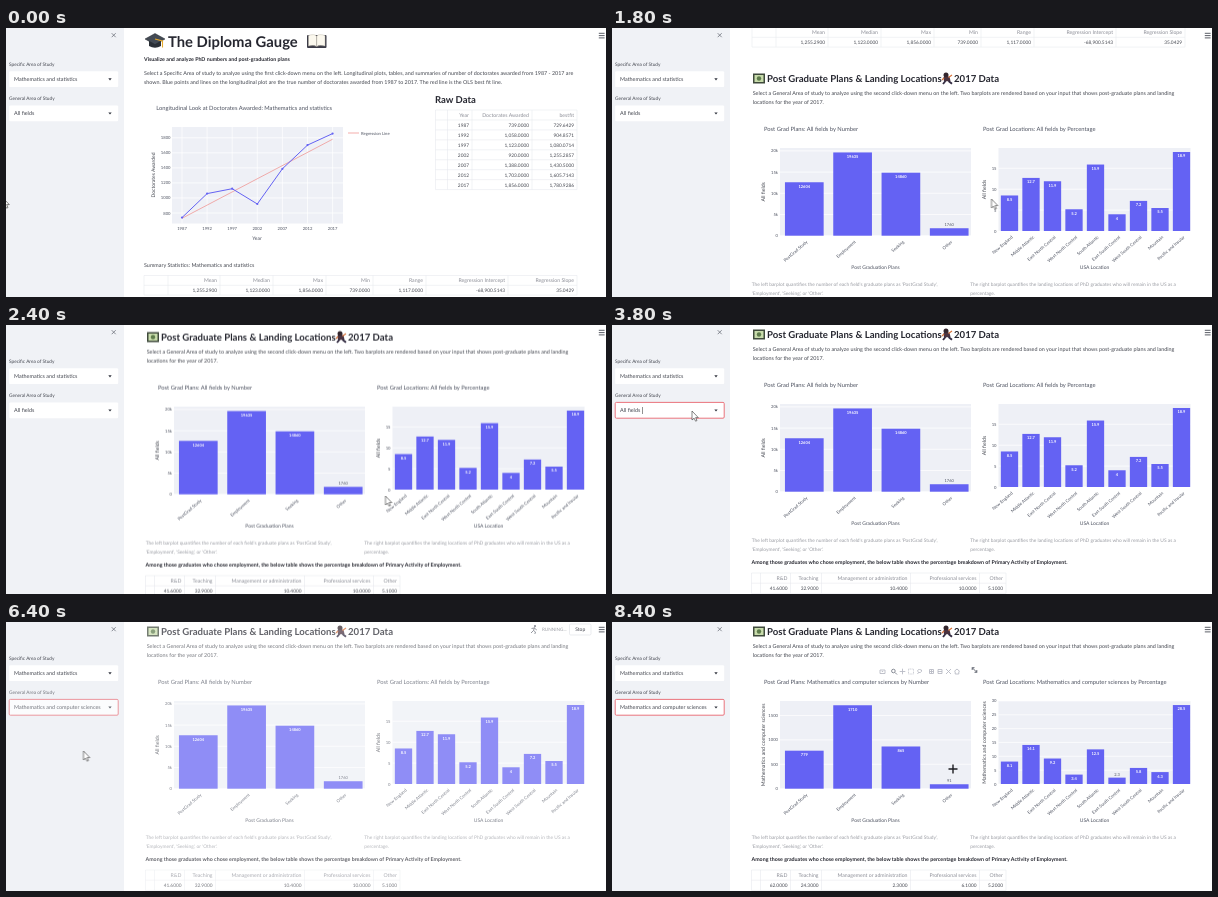
These frames come from a looping animation (600 px wide and 269 px high, 8500 ms). An HTML page:

```html
<!DOCTYPE html>
<html lang="en">
<head>
<meta charset="utf-8">
<title>The Diploma Gauge</title>
<style>
  html, body { margin: 0; width: 100%; height: 100%; overflow: hidden; background: #fff; }
  svg { display: block; width: 100%; height: 100%; }
  text { font-family: Lato, "Open Sans", sans-serif; fill: #43464f; text-rendering: geometricPrecision; }
  .bold { font-weight: 700; fill: #262730; }
  .soft { fill: #9a9ca3; }
  .head { fill: #8b8d96; }
  .plot { fill: #4d5260; }
  .value { fill: #fff; font-weight: 700; }
  .end { text-anchor: end; }
  .mid { text-anchor: middle; }
</style>
</head>
<body>
<svg id="stage" viewBox="0 0 600 269" preserveAspectRatio="none"></svg>
<script>
const LOOP = 8500, FRAME = 100;
const BLUE = '#6462f3', PLOT_BG = '#eef0f6', RULE = '#e3e5ea', RED = '#e8656f';

// ---- drawing helpers -------------------------------------------------
const escape = s => String(s).replace(/&/g, '&amp;').replace(/</g, '&lt;');
const text = (x, y, s, size = 5.4, cls = '') =>
  `<text x="${x}" y="${y + size * 0.36}" font-size="${size}" class="${cls}">${escape(s)}</text>`;
const turned = (x, y, angle, s, size, cls) =>
  `<g transform="translate(${x} ${y}) rotate(${angle})">${text(0, 0, s, size, cls)}</g>`;
const rect = (x, y, w, h, fill, extra = '') =>
  `<rect x="${x}" y="${y}" width="${w}" height="${h}" fill="${fill}" ${extra}/>`;
const path = (d, stroke, width = 0.6, fill = 'none') =>
  `<path d="${d}" stroke="${stroke}" stroke-width="${width}" fill="${fill}"/>`;
const group = (id, body) => `<g id="${id}">${body}</g>`;
const at = (x, y, body) => `<g transform="translate(${x} ${y})">${body}</g>`;

function table(top, rowHeight, edges, rows) {
  const [left, right] = [edges[0], edges.at(-1)];
  const bottom = top + rowHeight * rows.length;
  let d = edges.map(x => `M${x} ${top}V${bottom}`).join('');
  for (let i = 0; i <= rows.length; i++) d += `M${left} ${top + i * rowHeight}H${right}`;
  const cells = rows.map((row, r) => row.map((cell, c) =>
    text(edges[c + 2] - 3, top + (r + 0.52) * rowHeight, cell, r ? 4.8 : 5.2, r ? 'end' : 'end head')).join(''));
  return path(d, RULE, 0.5) + cells.join('');
}

function barChart(c) {
  const y = v => c.base - v * c.scale;
  let out = rect(c.left, 79, c.right - c.left, c.base - 79, PLOT_BG);
  c.ticks.forEach(([v, label]) => {
    out += path(`M${c.left} ${y(v)}H${c.right}`, '#fff', 0.7) + text(c.left - 2, y(v), label, 4.2, 'end plot');
  });
  c.values.forEach((v, i) => {
    const x = c.first + c.pitch * i, small = c.base - y(v) < 8;
    out += rect(x - c.width / 2, y(v), c.width, c.base - y(v), BLUE)
      + text(x, y(v) + (small ? -3.5 : 4), v, 4, small ? 'mid plot' : 'mid value')
      + turned(x + 2.5, c.base + 5.5, -41, c.names[i], 4.4, 'end plot');
  });
  return out + text(c.titleX, 60, c.title, 5.8, 'plot')
    + turned(c.fieldX, (79 + c.base) / 2, -90, c.field, 5.2, 'mid')
    + text((c.left + c.right) / 2, 198.5, c.xLabel, 5, 'mid plot');
}

// ---- top of the page -------------------------------------------------
const cap = path('M143 12V18Q149 21.5 155 18V12Z', 'none', 0, '#2a2f36')
  + path('M139 11L149 5.5L159 11L149 16.5Z', '#22262c', 0.5, '#434a54')
  + path('M149 11L156.5 13V19.5', '#e8ab2c', 1.1);
const book = rect(301, 7, 19.5, 13, '#3c3c48', 'rx="1"')
  + path('M302.5 7.5Q308 5.5 310.5 8V18.5Q308 16.5 302.5 18ZM319 7.5Q313 5.5 310.8 8V18.5Q313 16.5 319 18Z', '#b9b4a6', 0.4, '#fbf8ee');

const years = [1987, 1992, 1997, 2002, 2007, 2012, 2017];
const awarded = [739, 1058, 1123, 920, 1388, 1703, 1856];
const fit = [729.6429, 904.8571, 1080.0714, 1255.2857, 1430.5, 1605.7143, 1780.9286];
const decimals = v => v.toLocaleString('en-US', { minimumFractionDigits: 4 });

function lineChart() {
  const x = i => 176 + 25.1 * i, y = v => 185 - (v - 800) * 0.0752;
  const points = awarded.map((v, i) => `${x(i)} ${y(v)}`);
  let out = rect(166, 99, 171, 96.5, PLOT_BG);
  years.forEach((year, i) => {
    out += path(`M${x(i)} 99V195.5`, '#fff', 0.7) + text(x(i), 200.3, year, 4.2, 'mid plot');
  });
  for (let v = 800; v <= 1800; v += 200)
    out += path(`M166 ${y(v)}H337`, '#fff', 0.7) + text(164.5, y(v), v, 4.2, 'end plot');
  out += path(`M${x(0)} ${y(fit[0])}L${x(6)} ${y(fit[6])}M342 105H353`, '#f08c88', 0.7)
    + path('M' + points.join('L'), BLUE, 1)
    + awarded.map((v, i) => `<circle cx="${x(i)}" cy="${y(v)}" r="1.1" fill="${BLUE}"/>`).join('');
  return out + text(355, 105, 'Regression Line', 4.2, 'plot')
    + text(150.3, 79.7, 'Longitudinal Look at Doctorates Awarded: Mathematics and statistics', 5.8, 'plot')
    + turned(147, 147, -90, 'Doctorates Awarded', 5, 'mid')
    + text(251, 210, 'Year', 5, 'mid plot');
}

const overview = cap + book
  + text(162, 13.3, 'The Diploma Gauge', 14.8, 'bold')
  + text(138, 31, 'Visualize and analyze PhD numbers and post-graduation plans', 5.3, 'bold')
  + text(138, 45, 'Select a Specific Area of study to analyze using the first click-down menu on the left. Longitudinal plots, tables, and summaries of number of doctorates awarded from 1987 - 2017 are')
  + text(138, 54, 'shown. Blue points and lines on the longitudinal plot are the true number of doctorates awarded from 1987 to 2017. The red line is the OLS best fit line.')
  + lineChart()
  + text(429, 71.5, 'Raw Data', 9.5, 'bold')
  + table(82, 9.95, [429.5, 441.5, 466, 526, 571],
    [['Year', 'Doctorates Awarded', 'bestfit'],
      ...years.map((year, i) => [year, decimals(awarded[i]), decimals(fit[i])])])
  + text(138, 237.5, 'Summary Statistics: Mathematics and statistics')
  + table(247.5, 9.8, [138, 162, 214, 267, 320, 367, 420, 502, 571], [
    ['Mean', 'Median', 'Max', 'Min', 'Range', 'Regression Intercept', 'Regression Slope'],
    ['1,255.2900', '1,123.0000', '1,856.0000', '739.0000', '1,117.0000', '-68,900.5143', '35.0429']]);

// ---- lower part of the page ------------------------------------------
const bill = rect(141, 4.5, 12, 10, '#3f4a3c') + rect(142.5, 6, 9, 7, '#c8dcab')
  + '<circle cx="147" cy="9.5" r="2.2" fill="#5e7c4c"/>';
const dancer = '<circle cx="334" cy="6" r="2.5" fill="#33262d"/>'
  + path('M331.5 8L337.5 7.5L338.5 12L332 12.5Z', 'none', 0, '#4a3340')
  + path('M336.5 8.5L340 6M332 9L330 11', '#d9733a', 1.2)
  + path('M333.5 12L331 15M336.5 12L340 14.8', '#332c42', 1.9);

const plans = ['PostGrad Study', 'Employment', 'Seeking', 'Other'];
const regions = ['New England', 'Middle Atlantic', 'East North Central', 'West North Central', 'South Atlantic',
  'East South Central', 'West South Central', 'Mountain', 'Pacific and Insular'];
const planChart = o => barChart({ left: 168, right: 359, base: 166.7, first: 192.3, pitch: 48.3, width: 38.7,
  names: plans, titleX: 152, fieldX: 151.5, xLabel: 'Post Graduation Plans',
  title: `Post Grad Plans: ${o.field} by Number`, ...o });
const regionChart = o => barChart({ left: 386.5, right: 578.5, base: 162, first: 397.5, pitch: 21.5, width: 17.3,
  names: regions, titleX: 371, fieldX: 372.5, xLabel: 'USA Location',
  title: `Post Grad Locations: ${o.field} by Percentage`, ...o });

const dataset = (field, planOptions, regionOptions, shares) =>
  planChart({ field, ...planOptions }) + regionChart({ field, ...regionOptions })
  + table(248, 10.2, [139.5, 148.5, 178.5, 209.5, 298.5, 367.5, 394], [
    ['R&D', 'Teaching', 'Management or administration', 'Professional services', 'Other'],
    shares.map(v => v.toFixed(4))]);
const every = (step, max, label = v => v) =>
  Array.from({ length: max / step + 1 }, (_, i) => [i * step, label(i * step)]);

const allFields = dataset('All fields',
  { scale: 0.00424, ticks: every(5000, 20000, v => v ? v / 1000 + 'k' : 0), values: [12604, 19635, 14860, 1760] },
  { scale: 4.18, ticks: every(5, 15), values: [8.5, 12.7, 11.9, 5.2, 15.9, 4, 7.2, 5.5, 18.9] },
  [41.6, 32.9, 10.4, 10, 5.1]);
const mathFields = dataset('Mathematics and computer sciences',
  { scale: 0.0488, ticks: every(500, 1500), values: [779, 1710, 865, 91] },
  { scale: 2.77, ticks: every(5, 30), values: [8.1, 14.1, 9.2, 3.4, 12.5, 2.3, 5.8, 4.3, 28.5] },
  [62, 24.3, 2.3, 6.1, 5.2]);

const toolIcon = (x, d, stroke = '#b9bcc6') => at(x, 49.5, path(d, stroke, 0.9));
const toolbar = toolIcon(270.5, 'M-2.5 -1.5H2.5V2H-2.5ZM-.7 0H.7')
  + toolIcon(282, 'M1 1L3 3M1.2 -.5A1.8 1.8 0 1 1 -2.4 -.5A1.8 1.8 0 1 1 1.2 -.5', '#7c808c')
  + toolIcon(290.5, 'M-2.8 0H2.8M0 -2.8V2.8')
  + '<rect x="296.5" y="47" width="5" height="5" fill="none" stroke="#b9bcc6" stroke-dasharray="1 .6" stroke-width=".7"/>'
  + toolIcon(307.5, 'M-2 2.5L-1 1Q-3 -2 0 -2Q3 -2 2 0Q1 1.5 -1 1')
  + toolIcon(319.5, 'M-2 -2H2V2H-2ZM-2 0H2M0 -2V2')
  + toolIcon(328, 'M-2 -2H2V2H-2ZM-2 0H2')
  + toolIcon(336.5, 'M-2.5 -2.5L2.5 2.5M2.5 -2.5L-2.5 2.5')
  + toolIcon(345, 'M-2.8 0L0 -2.5L2.8 0M-1.8 0V2.5H1.8V0')
  + at(362.5, 48, path('M-2.3 0V-2.3H0M2.3 0V2.3H0M-2.3 -2.3L2.3 2.3', '#555a66', 0.9));

const outlook = bill + dancer
  + text(155, 9.7, 'Post Graduate Plans & Landing Locations', 9.6, 'bold')
  + text(342, 9.7, '2017 Data', 9.6, 'bold')
  + text(140.7, 23.7, 'Select a General Area of study to analyze using the second click-down menu on the left. Two barplots are rendered based on your input that shows post-graduate plans and landing')
  + text(140.7, 33.5, 'locations for the year of 2017.')
  + group('allFields', allFields) + group('mathFields', mathFields)
  + text(139.7, 215.5, "The left barplot quantifies the number of each field's graduate plans as 'PostGrad Study',", 4.85, 'soft')
  + text(139.7, 224, "'Employment', 'Seeking', or 'Other'.", 4.85, 'soft')
  + text(358.3, 215.5, 'The right barplot quantifies the landing locations of PhD graduates who will remain in the US as a', 4.85, 'soft')
  + text(358.3, 224, 'percentage.', 4.85, 'soft')
  + text(139.5, 237.3, 'Among those graduates who chose employment, the below table shows the percentage breakdown of Primary Activity of Employment.', 5.3, 'bold');

// ---- sidebar, menu and status ----------------------------------------
const selectBox = y => rect(3.2, y, 109, 15.8, '#fff', 'rx="1.2"')
  + path(`M102.3 ${y + 7}H105.7L104 ${y + 9.2}Z`, 'none', 0, '#333640');
const sidebar = rect(0, 0, 118, 269, '#f0f2f6')
  + path('M105.7 5.2L109.7 9.2M109.7 5.2L105.7 9.2', '#6d707a', 0.8)
  + text(3, 36, 'Specific Area of Study', 4.75) + selectBox(43.3)
  + text(8, 51.5, 'Mathematics and statistics', 5.45)
  + group('general', text(3, 70, 'General Area of Study', 4.75) + selectBox(77.4)
    + group('choiceAll', text(8, 85.5, 'All fields', 5.45))
    + group('choiceMath', text(8, 85.5, 'Mathematics and computer sciences', 5.45))
    + group('focus', rect(3.2, 77.4, 109, 15.8, 'none', `rx="1.2" stroke="${RED}" stroke-width=".9"`))
    + group('caret', path('M30.6 82V89', '#333', 0.6)));

const options = ['All fields', 'Life sciences', 'Physical sciences and earth sciences', 'Mathematics and computer sciences',
  'Psychology and social sciences', 'Engineering', 'Education', 'Humanities and arts', 'Other'];
const ROW = 14.4;
const menu = rect(2.5, 97, 111.5, 112, '#000', 'opacity=".08" rx="1.5"') + rect(3, 97, 110, 110, '#fff', 'rx="1.2"')
  + '<clipPath id="menuClip"><rect x="3" y="97" width="110" height="110"/></clipPath>'
  + `<g clip-path="url(#menuClip)">` + group('optionList',
    group('highlight', rect(3, 97, 107, ROW, '#eef0f5'))
    + options.map((name, i) => text(9, 104.2 + ROW * i, name)).join('')) + '</g>'
  + group('thumb', rect(110, 97, 2.2, 90, '#a5a7ac'));

const status = at(528, 7.5, '<circle cx="1" cy="-3.4" r="1.1" fill="#8a8d96"/>'
    + path('M.5 -2L-.5 1L1.5 2.5L.8 4.5M-.5 1L-3 3.5M-2.5 -1L.3 -1.5L2.8 .5', '#8a8d96', 0.9))
  + text(536, 7.8, 'RUNNING...', 4.6, 'soft')
  + rect(563.5, 2, 21.5, 11, '#fff', 'rx="1.2" stroke="#dcdfe5" stroke-width=".6"')
  + text(574.2, 7.5, 'Stop', 5, 'mid');

const pointer = group('arrow', path('M0 0V9L2.1 7.2L3.6 10.2L5 9.5L3.6 6.6H6.3Z', '#333', 0.6, '#fff'))
  + group('hand', path('M-1 1Q-1 0 0 0T1 1V4L4.5 5Q5.4 5.4 5.2 6.5L4.5 10H0L-3 6.8Q-3 5.5 -1 6.5Z', '#333', 0.6, '#fff'))
  + group('cross', path('M-4.5 0H4.5M0 -4.5V4.5', '#1d1d22', 1.4));

document.getElementById('stage').innerHTML = rect(0, 0, 600, 269, '#fff')
  + group('page', group('stale', overview + at(-2, 289, outlook + group('toolbar', toolbar))))
  + path('M592.8 5.3H598.6M592.8 7.6H598.6M592.8 9.9H598.6', '#4a4d57', 0.9)
  + group('status', status) + sidebar + group('menu', menu) + group('pointer', pointer);

// ---- timing: every segment advances in whole frames -------------------
function play(id, property, steps) {
  const all = [...steps, [LOOP, steps.at(-1)[1]]];
  const frames = all.map(([time, value], i) => ({
    offset: time / LOOP,
    [property]: value,
    easing: i + 1 < all.length ? `steps(${Math.max(1, Math.round((all[i + 1][0] - time) / FRAME))})` : 'linear'
  }));
  document.getElementById(id).animate(frames, { duration: LOOP, iterations: Infinity });
}
const move = (id, steps) =>
  play(id, 'transform', steps.map(([t, x, y]) => [t, `translate(${x}px, ${y}px)`]));
function show(id, ...spans) {
  const steps = spans[0][0] ? [[0, 0]] : [];
  for (const [from, to] of spans) {
    if (from) steps.push([from - FRAME, 0]);
    steps.push([from, 1]);
    if (to < LOOP) steps.push([to - FRAME, 1], [to, 0]);
  }
  play(id, 'opacity', steps);
}

move('page', [[0, 0, 0], [900, 0, 0], [1300, 0, -123.5], [1800, 2, -248], [2100, 2, -275], [2400, 2, -286.4], [2700, 2, -289]]);
move('pointer', [[0, -3, 170], [200, 266, 165], [300, 266, 165], [800, 379.5, 171], [2700, 379.5, 171],
  [3600, 85, 90], [3800, 80, 86], [4500, 80, 92], [5200, 80, 131], [5600, 77.5, 129], [7600, 77.5, 129], [8300, 341, 147]]);
show('arrow', [0, 4700], [5500, 8000]);
show('hand', [4700, 5500]);
show('cross', [8000, LOOP]);

show('focus', [3800, LOOP]);
show('caret', [3800, 5500]);
show('menu', [3900, 5500]);
move('optionList', [[0, 0, 0], [4700, 0, 0], [5100, 0, -16]]);
move('thumb', [[0, 0, 0], [4700, 0, 0], [5100, 0, 13]]);
move('highlight', [[0, 0, 0], [4700, 0, 0], [5000, 0, ROW * 3]]);

show('choiceAll', [0, 5500]);
show('choiceMath', [5500, LOOP]);
show('status', [5900, 7800]);
for (const id of ['stale', 'general'])
  play(id, 'opacity', [[0, 1], [5900, 1], [6300, 0.8], [6800, 0.42], [7400, 0.42], [7700, 1]]);
show('allFields', [0, 7500]);
show('mathFields', [7500, LOOP]);
show('toolbar', [8100, LOOP]);
</script>
</body>
</html>
```
